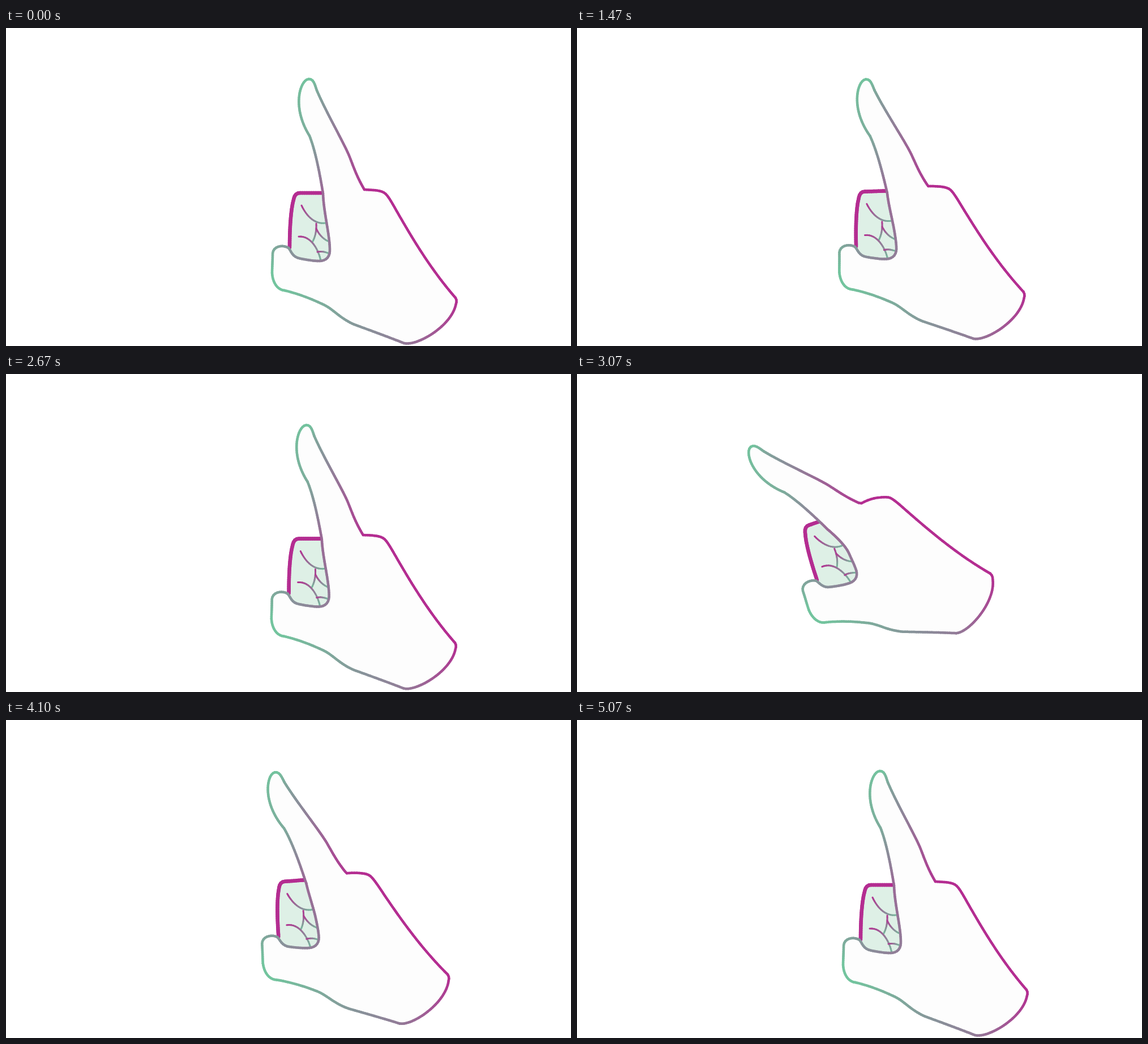
Animation of 998 by 561 pixels, one loop 5.11 s. Source, as an HTML page with a canvas:

```html
<!DOCTYPE html>
<html lang="en">
<head>
<meta charset="utf-8">
<title>Tapping hand</title>
<style>
  html, body { margin: 0; width: 100%; height: 100%; overflow: hidden; background: #fff; }
  canvas { display: block; width: 998px; height: 561px; }
</style>
</head>
<body>
<canvas id="stage" width="998" height="561"></canvas>
<script>
const ctx = document.getElementById('stage').getContext('2d');
const LOOP = 5110, TICK = 100 / 3, POSES = 16;
const GREEN = [115, 196, 158], MAGENTA = [180, 45, 145];
const PALM = { x: 750, y: 389 }, KNUCKLE = { x: 625, y: 337 };

const clamp = v => Math.min(1, Math.max(0, v));
const mix = (a, b, u) => a + (b - a) * u;

// Samples a path into points whose hue runs from green (0) to magenta (1).
function trace(d, from, to) {
  const path = document.createElementNS('http://www.w3.org/2000/svg', 'path');
  path.setAttribute('d', d);
  const length = path.getTotalLength(), steps = Math.ceil(length / 4);
  return Array.from({ length: steps + 1 }, (_, i) => {
    const { x, y } = path.getPointAtLength(length * i / steps);
    return { x, y, hue: mix(from, to, i / steps) };
  });
}

const outline = [
  trace('M633,285 C620,263 615,248 608,230 C600,208 566,150 549,110', .95, .2),
  trace('M549,110 C545,98 543,90 535,90', .2, 0),
  trace('M535,90 C521,90 503,137 536,190', 0, .15),
  trace('M536,190 C546,215 554,255 560,292', .15, .6),
  trace('M560,292 C561,325 572,365 572,392 C572,407 562,412 550,411', .6, .45),
  trace('M550,411 C543,411 525,408 517,406 C505,403 503,392 499,388', .45, .3),
  trace('M499,388 C490,382 472,384 471,398 C471,410 470,425 470,432', .3, 0),
  trace('M470,432 C471,450 480,462 492,463', 0, 0),
  trace('M492,463 C517,469 540,478 563,489 C580,498 590,512 615,523 C645,534 675,545 703,556', 0, .47),
  trace('M703,556 C725,562 788,526 795,486 Q797,481 794,476', .47, 1),
  trace('M794,476 C760,437 730,392 700,340 C688,320 678,300 671,293 C664,286 650,286 633,285', 1, 1)
].flat();

const fistEdge = trace('M501,387 C501,355 503,320 508,303 Q510,291 519,291 L575,291', 1, 1);
const fistInside = trace('M600,300 L590,400 L545,416 L512,408', 1, 1);
const creases = [
  'M522,313 C530,330 544,347 565,344',
  'M548,345 Q549,364 541,378',
  'M548,354 Q556,371 571,377',
  'M517,368 C540,366 553,394 556,411',
  'M550,395 Q560,393 571,398'
].map(d => trace(d, 1, .1));

function turn(p, pivot, deg) {
  const a = deg * Math.PI / 180, c = Math.cos(a), s = Math.sin(a);
  const dx = p.x - pivot.x, dy = p.y - pivot.y;
  return { x: pivot.x + dx * c - dy * s, y: pivot.y + dx * s + dy * c, hue: p.hue };
}

// The finger bends at the knuckle, fading out towards the palm.
function bend(p, lean) {
  const along = -.7 * (p.x - KNUCKLE.x) - .71 * (p.y - KNUCKLE.y);
  const weight = clamp((along - 12) / 22) * clamp((380 - p.y) / 90);
  return turn(p, KNUCKLE, -17 * Math.pow(lean, .9) * weight);
}

// The whole hand tilts while the palm travels along a straight line.
function swing(p, lean) {
  const { x, y, hue } = turn(p, PALM, -19 * lean);
  return { x: x - 90 * lean, y: y - 105 * lean, hue };
}

// Accelerating tap, then a decelerating return.
function leanAt(pose) {
  if (pose < 7.3) return Math.min(1.31, Math.max(0, pose - .3) ** 2 / 32.5);
  return 1.31 * Math.pow((15 - pose) / 7.7, 1.65);
}

function fillShape(pts, color) {
  ctx.beginPath();
  pts.forEach(p => ctx.lineTo(p.x, p.y));
  ctx.closePath();
  ctx.fillStyle = color;
  ctx.fill();
}

function strokeBlend(pts, width) {
  ctx.lineWidth = width;
  pts.slice(1).forEach((b, i) => {
    const a = pts[i];
    ctx.strokeStyle = `rgb(${GREEN.map((v, n) => Math.round(mix(v, MAGENTA[n], b.hue)))})`;
    ctx.beginPath();
    ctx.moveTo(a.x, a.y);
    ctx.lineTo(b.x, b.y);
    ctx.stroke();
  });
}

function drawBurst(pose) {
  if (pose < 8 || pose > 12) return;
  const reach = n => Math.max(50, 137 - 23 * Math.pow(.304, n));
  const inner = reach(pose - 10), outer = reach(pose - 8);
  ctx.strokeStyle = '#00acff';
  ctx.lineWidth = 14;
  ctx.beginPath();
  for (let i = 0; i < 8; i++) {
    const a = (i * 45 - 1.07) * Math.PI / 180, c = Math.cos(a), s = Math.sin(a);
    ctx.moveTo(303.5 + inner * c, 155.5 + inner * s);
    ctx.lineTo(303.5 + outer * c, 155.5 + outer * s);
  }
  ctx.stroke();
}

function drawHand(lean) {
  const rigid = pts => pts.map(p => swing(p, lean));
  const edge = rigid(fistEdge);
  fillShape(edge.concat(rigid(fistInside)), '#def0e6');
  strokeBlend(edge, 6.5);
  creases.forEach(c => strokeBlend(rigid(c), 3));
  const hand = outline.map(p => swing(bend(p, lean), lean));
  fillShape(hand, '#fdfdfd');
  strokeBlend(hand, 4.5);
}

function draw(time) {
  const tick = Math.floor((time % LOOP + 4) / TICK);
  const pose = Math.floor(tick * 5 / 12) % POSES;
  ctx.clearRect(0, 0, 998, 561);
  ctx.lineCap = ctx.lineJoin = 'round';
  drawBurst(pose);
  drawHand(leanAt(pose));
}

const start = performance.now();
function loop() {
  draw(performance.now() - start);
  requestAnimationFrame(loop);
}
loop();
</script>
</body>
</html>
```
